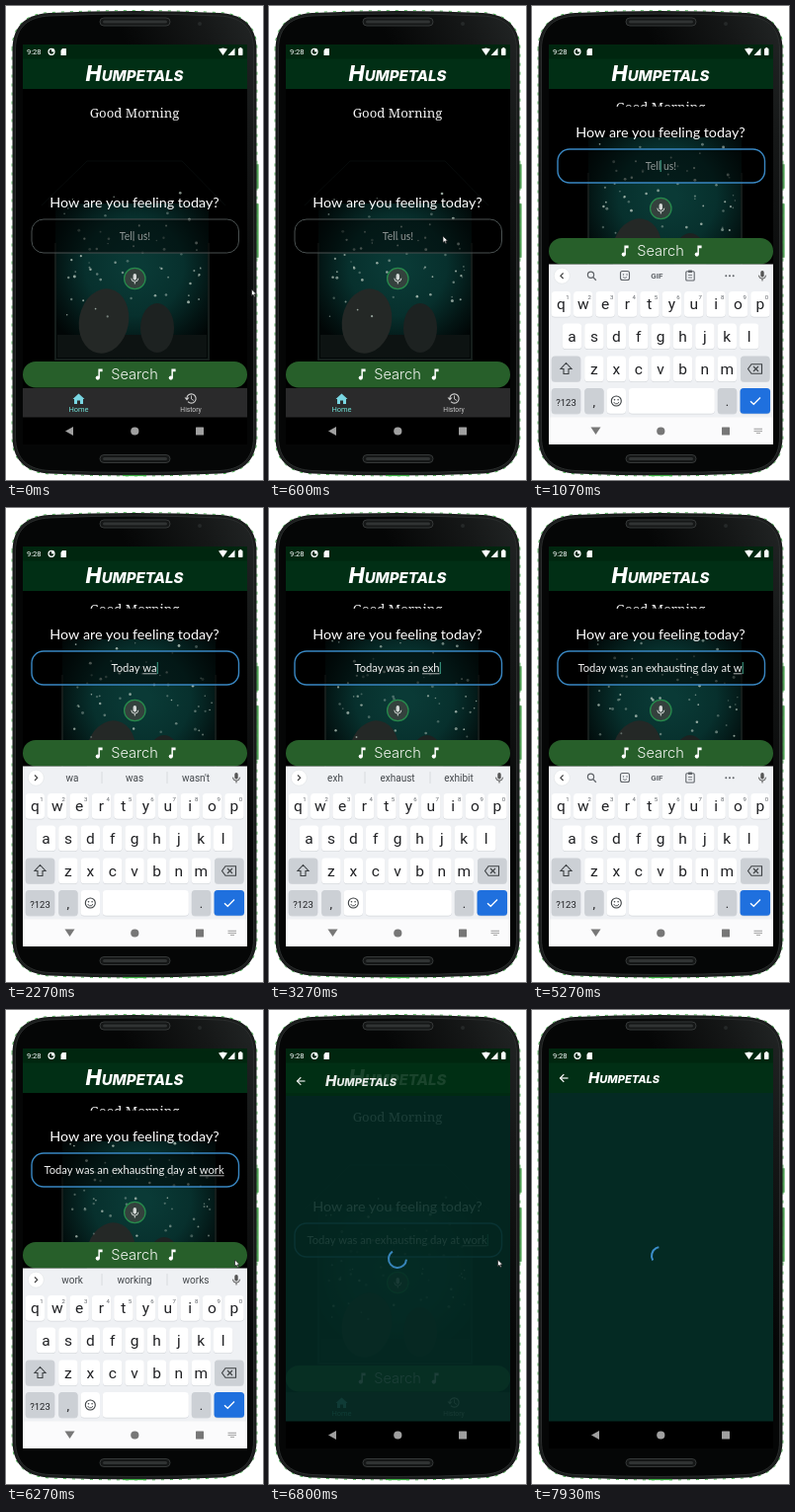
Recreate the animation shown at these times as an HTML page with a canvas. Size 260 by 480 pixels, loop 8 s.

```html
<!DOCTYPE html>
<html lang="en">
<head>
<meta charset="utf-8">
<title>Mood search</title>
<style>
  html, body { margin: 0; width: 100%; height: 100%; overflow: hidden; background: #fff; }
  canvas { display: block; width: 100vw; height: 100vh; }
</style>
</head>
<body>
<canvas id="stage"></canvas>
<script>
const LOOP = 8000, W = 260, H = 480, TAU = Math.PI * 2;
const APP = 'Humpetals';
const MESSAGE = 'Today was an exhausting day at work';
const TITLE = 'Inter, sans-serif', HAND = 'Lato, sans-serif', UI = 'Roboto, sans-serif';
const canvas = document.getElementById('stage');
const c = canvas.getContext('2d');
const scale = Math.max(1, window.devicePixelRatio || 1);
canvas.width = W * scale;
canvas.height = H * scale;

// [time, typed characters]
const typing = [[1300, 0], [1850, 6], [2080, 8], [2350, 8], [2800, 13], [3100, 16], [3300, 16],
  [4050, 24], [4240, 24], [4390, 27], [4600, 27], [5000, 31], [5550, 35]];
const hints = {
  Today: ['Today', "Today's"], was: ['was', "wasn't"], an: ['and', 'any'], exhausting: ['exhaust', 'exhibit'],
  day: ['days', 'daily'], at: ['attention', 'ate'], work: ['working', 'works']
};
const FOCUS = 620, RESIZE = 720, PRESS = 6380, HIDE = 6450, PAGE = 6600;

const clamp = v => Math.min(1, Math.max(0, v));
const smooth = v => { v = clamp(v); return v * v * (3 - 2 * v); };
const span = (t, a, b) => smooth((t - a) / (b - a));
const mix = (a, b, k) => a + (b - a) * k;

function random(seed) {
  return () => (seed = (seed * 16807) % 2147483647) / 2147483647;
}
const rnd = random(77);
const fireflies = Array.from({ length: 62 }, () => ({
  x: 60 + rnd() * 140, y: 190 + rnd() * 125, r: .7 + rnd() * .8, phase: rnd() * TAU
}));

function paint(fill, stroke, width = 1) {
  if (fill) { c.fillStyle = fill; c.fill(); }
  if (stroke) { c.strokeStyle = stroke; c.lineWidth = width; c.stroke(); }
}
function box(x, y, w, h, r, fill, stroke, width) {
  c.beginPath();
  c.roundRect(x, y, w, h, r);
  paint(fill, stroke, width);
}
function disc(x, y, r, fill, stroke, width) {
  c.beginPath();
  c.arc(x, y, r, 0, TAU);
  paint(fill, stroke, width);
}
function poly(points, fill, stroke, width) {
  c.beginPath();
  points.forEach(p => c.lineTo(...p));
  c.closePath();
  paint(fill, stroke, width);
}
function line(points, color, width = 1) {
  c.beginPath();
  points.forEach(p => c.lineTo(...p));
  paint(null, color, width);
}
function text(s, x, y, size, color, family = UI, style = '', align = 'center') {
  c.font = `${style} ${size}px ${family}`;
  c.textAlign = align;
  c.fillStyle = color;
  c.fillText(s, x, y);
}
function clipTo(x, y, w, h, draw) {
  c.save();
  c.beginPath();
  c.rect(x, y, w, h);
  c.clip();
  draw();
  c.restore();
}
function mic(x, y, color) {
  box(x - 1.7, y - 5, 3.4, 6.6, 1.7, color);
  c.beginPath();
  c.arc(x, y - .3, 3.5, 0, Math.PI);
  paint(null, color);
  line([[x, y + 3.2], [x, y + 5.5]], color);
}
function note(x, y) {
  disc(x - 1.2, y + 3.6, 2.1, '#fff');
  poly([[x - .6, y - 5.5], [x + 3.6, y - 5.5], [x + 3.6, y - 2.8], [x + .9, y - 2.8], [x + .9, y + 3.6], [x - .6, y + 3.6]], '#fff');
}

function typedAt(t) {
  for (let i = typing.length - 1; i >= 0; i--) {
    const [a, n] = typing[i], next = typing[i + 1];
    if (t < a) continue;
    return next ? Math.floor(mix(n, next[1], (t - a) / (next[0] - a))) : n;
  }
  return 0;
}
function lastKeyTime(t) {
  const n = typedAt(t);
  let s = t;
  while (s > FOCUS && typedAt(s - 10) === n) s -= 10;
  return Math.max(s, FOCUS);
}

// Phone outline with slightly bulging top and bottom edges.
function shell(inset, fill, stroke, width) {
  const l = 6.5 + inset, r = 253.5 - inset, top = 5 + inset, bottom = 475.5 - inset;
  c.beginPath();
  c.moveTo(l, 44);
  c.bezierCurveTo(l, top + 12, 24, top + 3, 44, top + 2);
  c.quadraticCurveTo(130, top - 2, 216, top + 2);
  c.bezierCurveTo(236, top + 3, r, top + 12, r, 44);
  c.lineTo(r, 436);
  c.bezierCurveTo(r, bottom - 12, 236, bottom - 3, 216, bottom - 2);
  c.quadraticCurveTo(130, bottom + 2, 44, bottom - 2);
  c.bezierCurveTo(24, bottom - 3, l, bottom - 12, l, 436);
  c.closePath();
  paint(fill, stroke, width);
}

function phone() {
  box(252.5, 160, 3, 25, 1, '#4f9a54', '#8cc58f', .6);
  box(252.5, 200, 3, 55, 1, '#4f9a54', '#8cc58f', .6);
  c.setLineDash([3, 6]);
  shell(-.4, null, '#48b350', 1);
  c.setLineDash([]);
  shell(0, '#191b1b');
  const sheen = c.createLinearGradient(130, 60, 250, 10);
  sheen.addColorStop(0, '#050606');
  sheen.addColorStop(.6, '#151717');
  sheen.addColorStop(1, '#222525');
  shell(3, sheen, '#303333', .8);
  line([[118, 475.5], [142, 475.5]], '#3fb446', 1.2);
  [12, 454.5].forEach(y => {
    box(95, y, 71, 8, 4, '#151717', '#353838', 1);
    box(98, y + 2.5, 65, 3, 1.5, '#303333');
  });
  disc(196, 18, 2, '#252929');
}

function statusBar() {
  box(17, 39, 227, 14.5, 0, '#00260f');
  text('9:28', 21, 49.3, 7.6, '#fff', UI, '', 'left');
  disc(46, 46.3, 3, null, '#fff', 1.2);
  box(46, 43.5, 3, 3, 1, '#fff');
  poly([[57, 43], [61, 43], [61, 50], [55.5, 50], [55.5, 45]], '#fff');
  poly([[215, 43.5], [219.5, 42.5], [224, 43.5], [219.5, 50]], '#fff');
  poly([[231.5, 42.5], [231.5, 50], [224.5, 50]], '#fff');
  box(235, 43, 4.5, 7, .8, '#fff');
  box(236.3, 42, 2, 1.5, 0, '#fff');
}
function appBar() {
  box(17, 53, 227, 31, 0, '#012f15');
}
function navBar(light) {
  const color = light ? '#777' : '#a0a0a0';
  box(17, 416.5, 227, 27.5, 0, light ? '#fbfbfc' : '#000');
  poly(light ? [[59.5, 426.5], [69.5, 426.5], [64.5, 434]] : [[60, 430.5], [68, 426], [68, 435]], color);
  disc(130.3, 430.5, 4.1, color);
  box(192, 426.5, 8, 8, .5, color);
  if (light) {
    line([[224.5, 428.3], [233, 428.3]], '#aaa', 1.2);
    line([[224.5, 430.5], [233, 430.5]], '#aaa', 1.2);
    line([[227, 432.5], [231, 432.5]], '#aaa', 1);
  }
}

function scene(t, open) {
  c.save();
  if (open) c.translate(7, -71);
  line([[36, 202], [82, 157], [178, 157], [222, 202]], '#070b0b');
  c.beginPath();
  c.rect(50, 200, 155, 158);
  const glow = c.createRadialGradient(130, 264, 10, 130, 264, 98);
  glow.addColorStop(0, '#0a3a36');
  glow.addColorStop(.45, '#07302d');
  glow.addColorStop(.8, '#031413');
  glow.addColorStop(1, '#010606');
  paint(glow);
  line([[50, 240], [50, 358], [205, 358], [205, 240]], '#151d1b', 2);
  box(52, 333, 151, 23, 0, '#0d1312');
  c.beginPath();
  c.ellipse(99, 319, 25, 33, .2, 0, TAU);
  paint('#242826');
  c.beginPath();
  c.ellipse(153, 326, 17, 25, 0, 0, TAU);
  paint('#1d2221');
  fireflies.forEach(f => {
    const a = t / LOOP * TAU + f.phase;
    c.globalAlpha = .6 + .25 * Math.sin(2 * a);
    disc(f.x + 3 * Math.sin(a), f.y + 3 * Math.cos(a), f.r, '#aebfb6');
  });
  c.globalAlpha = 1;
  c.restore();
}

function field(t, y) {
  const focused = t >= FOCUS;
  box(26, y, 209.5, 34, 12, 'rgba(0,0,0,.5)', focused ? '#3987c2' : '#4a5151', focused ? 1.4 : 1);
  const typed = MESSAGE.slice(0, typedAt(t)), base = y + 20.8;
  if (!typed) text('Tell us!', 130.5, base, 10.5, '#8f9695', HAND);
  c.font = `11.2px ${HAND}`;
  const width = c.measureText(typed).width, left = 129.5 - width / 2;
  if (typed) {
    const start = typed.lastIndexOf(' ') + 1;
    text(typed, left, base, 11.2, '#f2f2f2', HAND, '', 'left');
    const from = left + c.measureText(typed.slice(0, start)).width;
    if (start < typed.length) line([[from, base + 2], [left + width, base + 2]], '#ddd', .8);
  }
  if (focused && (t - lastKeyTime(t)) % 1000 < 500) {
    line([[left + width + .7, y + 11], [left + width + .7, y + 23]], '#3fa58c', 1);
  }
}

function home(t, open) {
  const dy = open ? -71 : 0, searchY = open ? 235 : 360;
  box(17, 84, 227, 333, 0, '#000');
  clipTo(17, open ? 133 : 84, 227, open ? 129 : 276, () => scene(t, open));
  clipTo(17, 84, 227, open ? 17.7 : 100, () =>
    text('Good Morning', 130, open ? 107 : 112.5, 13.2, '#f4f4f4', 'Noto Serif, serif', '500'));
  text('How are you feeling today?', 130, 204.3 + dy, 14.3, '#fff', HAND);
  field(t, 216 + dy);

  disc(130.3, 276 + dy, 10.7, '#34413d', '#278a4c', 1.3);
  mic(130.3, 276 + dy, '#d4d8d6');

  box(17, searchY, 227, 26.5, 13, t > PRESS && t < HIDE ? '#3b773c' : '#275f2a');
  text('Search', 130, searchY + 18, 14.6, '#f2f5f0', TITLE, '300');
  [94, 168].forEach(x => note(x, searchY + 13));

  appBar();
  text(APP, 130, 76, 21.5, '#fff', TITLE, 'italic small-caps 800');
  if (open) return;
  box(17, 387, 227, 30, 0, '#2a2a2b');
  poly([[73.5, 392.5], [79.5, 398], [78, 398], [78, 403], [75, 403], [75, 399.5], [72, 399.5],
    [72, 403], [69, 403], [69, 398], [67.5, 398]], '#79d6e2');
  text('Home', 73.5, 411, 7.5, '#6fe0d6');
  c.beginPath();
  c.arc(187.5, 397.5, 4.6, -2.9, 2.4);
  paint(null, '#ccc', 1.1);
  poly([[180.5, 396.5], [185.5, 396.5], [183, 399.5]], '#ccc');
  line([[187.5, 394.5], [187.5, 398], [190, 399.5]], '#ccc', .9);
  text('History', 187, 411, 6.7, '#c9c9c9');
}

function toolbar(t) {
  const word = MESSAGE.slice(0, typedAt(t - 150)).split(' ').pop();
  const d = word ? 1 : -1, ink = '#5f6368';
  disc(30.3, 273.2, 8, '#fff', '#e0e2e5', .6);
  line([[30.3 - 1.3 * d, 270.5], [30.3 + 1.4 * d, 273.2], [30.3 - 1.3 * d, 276]], '#444', 1.2);
  mic(233, 273, '#555');
  if (word) {
    const full = Object.keys(hints).find(k => k.startsWith(word));
    [word, ...hints[full]].forEach((s, i) => text(s, [67, 130, 192][i], 276.8, 10, '#43474b'));
    [97, 163].forEach(x => line([[x, 267], [x, 279]], '#d4d7da', .8));
    return;
  }
  disc(59.5, 272.3, 3.1, null, ink, 1.2);
  line([[61.8, 274.6], [64.8, 277.8]], ink, 1.3);
  box(89.5, 268.5, 9, 9, 2, null, ink, 1.1);
  disc(92.5, 272, .7, ink);
  disc(96, 272, .7, ink);
  line([[92, 274.5], [94, 275.5], [96, 274.5]], ink, .8);
  text('GIF', 126.3, 276, 8, ink, UI, 'bold');
  box(155.8, 268.8, 8.4, 9.2, 1, null, ink, 1.1);
  box(158, 267.4, 4, 2.5, .5, ink);
  line([[158, 272.5], [162, 272.5]], ink, .8);
  line([[158, 275], [162, 275]], ink, .8);
  [196.3, 200, 203.7].forEach(x => disc(x, 273.3, 1, ink));
}

function key(x, y, w, label, fill = '#fff', size = 15.5) {
  box(x - w / 2, y - 12.5, w, 26, 3.5, '#d5d8dc');
  box(x - w / 2, y - 13, w, 25.7, 3.5, fill);
  if (label) text(label, x, y + 5, size, '#202124');
}

function keyboard(t) {
  const step = 22.4, grey = '#ccd0d5', ink = '#3c4043';
  box(17, 261.5, 227, 156, 0, '#eff1f4');
  toolbar(t);
  [['qwertyuiop', 29.3, 302], ['asdfghjkl', 40.5, 334.5], ['zxcvbnm', 62.9, 367.5]].forEach(([letters, x0, y], row) =>
    [...letters].forEach((ch, i) => {
      const x = x0 + i * step;
      key(x, y, 19.4, ch);
      if (!row) text((i + 1) % 10, x + 6.6, y - 5.5, 6, '#5f6368');
    }));
  key(34.5, 367.5, 29.5, '', grey);
  poly([[34.5, 361.5], [40, 367.5], [37, 367.5], [37, 372.5], [32, 372.5], [32, 367.5], [29, 367.5]], null, ink, 1.1);
  key(225.8, 367.5, 29.5, '', grey);
  poly([[218.5, 367.5], [222, 362.7], [232.5, 362.7], [232.5, 372.3], [222, 372.3]], null, ink, 1.1);
  line([[224, 365], [229, 370]], ink, 1.1);
  line([[229, 365], [224, 370]], ink, 1.1);

  key(34.5, 400, 29.5, '?123', grey, 9.5);
  key(62.9, 400, 19.4, ',', grey, 13);
  key(85.3, 400, 19.4);
  disc(85.3, 400, 5, null, ink, 1.1);
  disc(83.5, 398.7, .8, ink);
  disc(87.1, 398.7, .8, ink);
  c.beginPath();
  c.arc(85.3, 400.3, 2.6, .3, Math.PI - .3);
  paint(null, ink, .9);
  key(141.3, 400, 87);
  key(197.5, 400, 19.4, '.', grey, 13);
  key(225.8, 400, 30.5, '', '#1f70de');
  line([[221, 400.2], [224.3, 403.3], [231, 396.5]], '#fff', 1.3);
}

function loading(t) {
  box(17, 84, 227, 333, 0, '#042a23');
  appBar();
  line([[36.5, 69], [28.5, 69]], '#fff', 1.2);
  line([[32.3, 65.2], [28.5, 69], [32.3, 72.8]], '#fff', 1.2);
  text(APP, 57, 74, 15.2, '#fff', TITLE, 'italic small-caps 800', 'left');
  // Indeterminate ring: the head runs ahead, then the tail catches up.
  const dt = t - 7930, cycle = dt / 1333 + .2, p = cycle - Math.floor(cycle);
  const base = 150 + dt * .2 + Math.floor(cycle) * 280;
  const tail = base + 280 * smooth(2 * p - 1), head = base + 10 + 280 * smooth(2 * p);
  c.beginPath();
  c.arc(130, 249, 9, tail * TAU / 360, head * TAU / 360);
  paint(null, '#3d8fcb', 2);
}

function pointer(t) {
  let x, y;
  if (t < 950) {
    const k = span(t, 70, 580);
    x = mix(248.5, 176, k);
    y = mix(287, 233, k);
  } else if (t > 5750 && t < 7400) {
    const k = span(t, 5750, 6200) - span(t, 6950, 7400);
    x = mix(262, 231.5, k);
    y = mix(273, 253, k);
  } else return;
  const arrow = [[0, 0], [0, 6.5], [1.6, 5.2], [2.7, 7.5], [3.7, 7], [2.7, 4.9], [4.6, 4.6]];
  poly(arrow.map(p => [x + p[0], y + p[1]]), '#fff', '#222', .7);
}

function draw(t) {
  c.setTransform(scale, 0, 0, scale, 0, 0);
  box(0, 0, W, H, 0, '#fff');
  phone();
  const raised = span(t, FOCUS, 870) - span(t, HIDE, 6650);
  const open = t >= RESIZE && t < PAGE;
  clipTo(17, 39, 227, 405, () => {
    if (t < 6850) home(t, open);
    if (raised > 0) {
      c.save();
      c.translate(0, 156 * (1 - raised));
      keyboard(t);
      c.restore();
    }
    if (t >= PAGE) {
      const k = span(t, PAGE, 6850);
      c.save();
      c.globalAlpha = k;
      c.translate(0, 30 * (1 - k));
      loading(t);
      c.restore();
    }
    statusBar();
    navBar(raised > 0);
  });
  pointer(t);
}

const started = performance.now();
function tick() {
  draw((performance.now() - started) % LOOP);
  requestAnimationFrame(tick);
}
tick();
</script>
</body>
</html>
```
